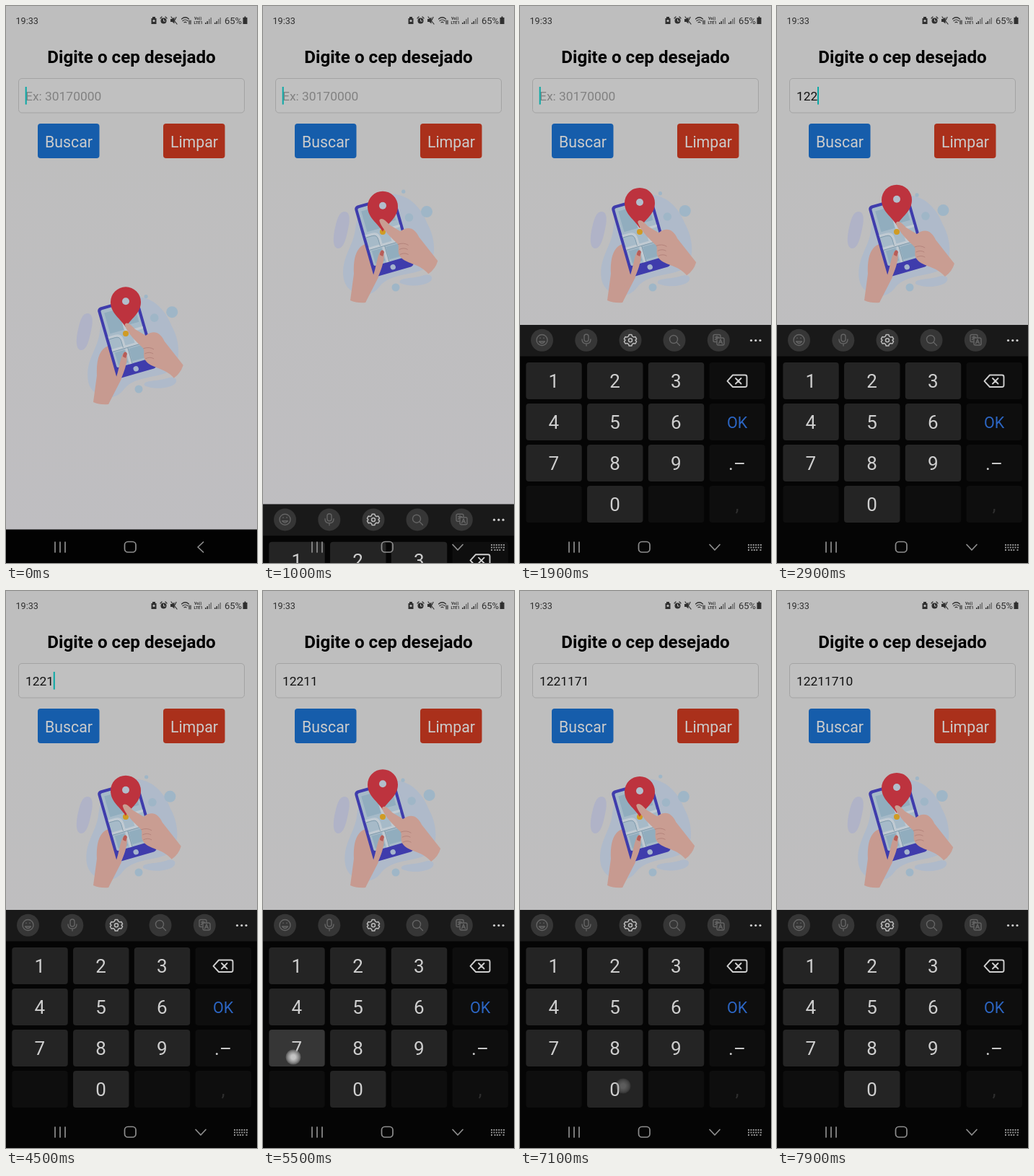
Animation, 348 px wide and 772 px high, one loop 8 s. Source, as an HTML page:

```html
<!DOCTYPE html>
<html lang="pt-BR">
<head>
<meta charset="utf-8">
<title>Busca de CEP</title>
<style>
html, body { margin: 0; width: 100%; height: 100%; overflow: hidden; background: #bebebe; }
svg { display: block; width: 348px; height: 772px; font-family: Roboto, Arial, sans-serif; }
.mid { text-anchor: middle; }
.line { fill: none; stroke-linecap: round; stroke-linejoin: round; }
</style>
</head>
<body>
<svg viewBox="0 0 348 772">
  <defs>
    <linearGradient id="page" x2="0" y2="1">
      <stop offset=".25" stop-color="#bebebe"/><stop offset="1" stop-color="#bfbec1"/>
    </linearGradient>
    <radialGradient id="glow">
      <stop offset=".3" stop-color="#c4c4c4"/><stop offset=".75" stop-color="#858585"/><stop offset="1" stop-color="#777" stop-opacity=".5"/>
    </radialGradient>
    <clipPath id="screen"><rect x="4" y="4" width="50" height="83" rx="2"/></clipPath>
  </defs>
  <rect width="348" height="772" fill="url(#page)"/>

  <!-- status bar -->
  <g fill="#303030">
    <text x="13.500" y="24.500" font-size="12.600">19:33</text>
    <text x="303" y="24.500" font-size="13">65%</text>
    <path d="M203 15h4v2h1.500v8h-7v-8h1.500z"/>
    <circle cx="205" cy="20.500" r="1.600" fill="#bebebe"/>
    <circle cx="218.500" cy="20.500" r="4"/>
    <path d="M228 18h2.500l3-2.500v9l-3-2.500H228z"/>
    <path d="M328.500 16h2v-1.500h2V16h2v9h-6z"/>
    <g font-size="5.500" font-weight="700"><text x="261" y="19">Vo))</text><text x="260.500" y="25">LTE1</text></g>
    <path d="M276 25v-2h1.500v2zM278.500 25v-4h1.500v4zM289 25v-2h1.500v2zM291.500 25v-4h1.500v4z"/>
    <path d="M281 25v-7h1.500v7zM283.500 25v-9h1.500v9zM294 25v-7h1.500v7zM296.500 25v-9h1.500v9z" opacity=".55"/>
  </g>
  <g class="line" stroke="#303030" stroke-width="1.200">
    <path d="M214 17l2-2M223 17l-2-2M236 15.500l-2 4M229 15l8 10M243.500 18q5-4.500 10 0M245 20.500q3.500-3 7 0M247 22.800q1.500-1.500 3 0M254 20v5M256 25v-5"/>
    <path d="M218.500 18.500v2.500h2" stroke="#bebebe" stroke-width="1"/>
  </g>

  <!-- form -->
  <text class="mid" x="174" y="79" font-size="24.200" font-weight="700">Digite o cep desejado</text>
  <rect x="17.500" y="100.500" width="313" height="47.500" rx="4.500" fill="#c0c0c0" stroke="#a3a3a3"/>
  <text id="field" x="27" y="131" font-size="17.400"></text>
  <rect id="caret" y="112" width="2" height="24.500" fill="#0aa9a6"/>
  <rect x="44" y="163" width="85.500" height="48" rx="4" fill="#165dab"/>
  <rect x="218" y="163" width="85.500" height="48" rx="4" fill="#aa301b"/>
  <g class="mid" font-size="21.300" fill="#cbcbcb"><text x="87" y="195.500">Buscar</text><text x="261" y="195.500">Limpar</text></g>

  <!-- illustration -->
  <g id="art">
    <path d="M113 285C121 285 121 297 118 309C115 323 112 336 104 336C96 335 97 320 100 307C103 294 106 285 113 285Z" fill="#b0b3c7"/>
    <g id="blob" fill="#afbaca">
      <path d="M172 263C198 258 220 276 230 303C241 322 243 350 232 362C216 376 180 370 164 390C150 411 118 402 114 379C110 350 127 336 130 312C134 282 148 266 172 263Z"/>
      <path d="M192 385C190 377 210 380 224 375C236 371 240 379 233 384C222 391 200 390 192 385Z"/>
    </g>
    <g id="dots" fill="#9fb6c7">
      <circle cx="230.500" cy="283" r="8"/><circle cx="206" cy="291" r="5.800"/>
    </g>
    <g fill="#9fb6c7"><circle cx="184" cy="390" r="5.500"/><circle id="speck" cx="194" cy="262" r="2.600"/></g>
    <path d="M121 408L126 371C125 348 130 334 142 330L160 376L142 411Q130 412 121 408Z" fill="#c79a90"/>
    <g transform="translate(126 278) rotate(-16)">
      <rect width="58" height="102" rx="5" fill="#3f3cac"/>
      <g clip-path="url(#screen)">
        <rect width="58" height="90" fill="#a6bac8"/>
        <path d="M8 9h20v30H8zM33 9h18v25H33zM7 66h14v18H7zM27 66h23v18H27z" fill="#91adbe"/>
        <path class="line" d="M0 44H14Q22 44 22 52V62M0 62H58M30 0V38Q30 43 36 43H58M24 62V90M39 43V62" stroke="#c0cad2" stroke-width="3.500"/>
        <path class="line" d="M0 46H13Q20 46 20 53V62M0 64H58M26 64V90" stroke="#7f9aaa" stroke-width=".9"/>
      </g>
      <circle cx="29" cy="95.500" r="3.700" fill="#a5b4cc"/>
    </g>
    <circle cx="166" cy="313" r="4" fill="#d09b24"/>
    <g id="pin">
      <path d="M166 306C159 294 145 287 145 271A21 21 0 0 1 187 271C187 287 173 294 166 306Z" fill="#bd333e"/>
      <circle cx="166" cy="270" r="5" fill="#b2becb"/>
    </g>
    <path d="M152 376C158 360 158 343 165 338C171 342 167 360 158 379C149 391 146 398 142 411L134 402Z" fill="#c79a90"/>
    <path d="M162 345C162 339 166 336 168 341L166 347Z" fill="#b75d58"/>
    <g id="hand">
      <path d="M165 301C167 296 173 300 179 307L194 316C205 308 214 311 220 324L246 357Q243 368 233 375C222 362 208 362 198 355C188 347 193 341 191 334C183 326 168 313 165 301Z" fill="#c99d92"/>
      <path class="line" d="M191 334Q199 331 205 335M193 341Q199 338 204 341M194 348Q200 345 205 348" stroke="#b4847c"/>
    </g>
  </g>

  <rect y="725.500" width="348" height="47" fill="#020202"/>

  <!-- keyboard -->
  <g id="board">
    <rect y="442" width="348" height="360" fill="#050505"/>
    <rect y="442" width="348" height="43.500" fill="#191919"/>
    <g id="tools" fill="#363636"></g>
    <g class="line" stroke="#646464" stroke-width="1.400">
      <circle cx="30.500" cy="463" r="7.500"/><path d="M26.500 465q4 5 8 0zM28 460v.5M33 460v.5"/>
      <rect x="89" y="455" width="6" height="10" rx="3"/><path d="M86 462q0 6 6 6t6-6M92 468v3"/>
      <circle cx="213" cy="462" r="5.500"/><path d="M217 466l4.500 4.500"/>
      <rect x="268" y="455.500" width="10" height="10" rx="2"/><rect x="273" y="460" width="10" height="10" rx="2" fill="#363636"/>
      <path d="M270.500 459h5M273 457.500q0 4-2.500 5M275.500 468l2.500-6 2.500 6M276.500 466h3"/>
    </g>
    <g class="line" stroke="#bcbcbc" stroke-width="1.500">
      <path d="M151.200 455.500h3.600l.8 2.300 2 1.100 2.300-.5 1.700 3-1.600 1.800 1.600 1.800-1.700 3-2.300-.5-2 1.100-.8 2.300h-3.600l-.8-2.300-2-1.100-2.300.5-1.700-3 1.600-1.800-1.600-1.800 1.700-3 2.300.5 2-1.100z"/>
      <circle cx="153" cy="463.200" r="2.500"/>
    </g>
    <g fill="#d0d0d0"><circle cx="320.500" cy="463.500" r="1.600"/><circle cx="326.800" cy="463.500" r="1.600"/><circle cx="333" cy="463.500" r="1.600"/></g>
    <g id="keys" class="mid"></g>
    <path class="line" d="M295 511.500H312Q314.500 511.500 314.500 514V525.500Q314.500 528 312 528H295L287.500 519.800ZM299 516l7.500 7.500M306.500 516l-7.500 7.500" stroke="#cfcfcf" stroke-width="1.900"/>
    <circle id="touch" r="10.500" fill="url(#glow)"/>
  </g>

  <!-- navigation -->
  <g class="line" stroke="#8e8e8e" stroke-width="1.700">
    <path d="M68 743v14M75 743v14M82 743v14"/>
    <rect x="164.500" y="742.500" width="15.500" height="14.500" rx="4.500"/>
    <path id="back" d="M273.500 743l-7.500 7 7.500 7"/>
  </g>
  <path id="grid" d="M316 747h19M316 750.500h19M316 754h2.500M320.500 754h10M332.500 754h2.500" stroke="#929292" stroke-width="2" stroke-dasharray="2 1.400"/>
</svg>
<script>
const $ = id => document.getElementById(id);
const NS = 'http://www.w3.org/2000/svg';
const LOOP = 8000, OPEN = 965;

// digit, finger down, finger up, touch x, touch y
const taps = [
  ['1', 1950, 2060, 44, 524],
  ['2', 2290, 2400, 130, 524],
  ['2', 2630, 2740, 130, 524],
  ['1', 4000, 4110, 44, 524],
  ['1', 4790, 4900, 44, 524],
  ['7', 5440, 5600, 42, 646],
  ['1', 6220, 6360, 44, 524],
  ['0', 7080, 7180, 143, 686]
];

function add(parent, tag, attrs, text = '') {
  const el = document.createElementNS(NS, tag);
  for (const k in attrs) el.setAttribute(k, attrs[k]);
  el.textContent = text;
  return parent.appendChild(el);
}
const set = (id, name, value) => $(id).setAttribute(name, value);
const move = (id, x, y) => set(id, 'transform', `translate(${x} ${y})`);

[30.5, 91.8, 153, 214, 275.3].forEach(cx => add($('tools'), 'circle', { cx, cy: 463.2, r: 15.5 }));

const keys = {};
['1', '2', '3', '', '4', '5', '6', 'OK', '7', '8', '9', '.–', '', '0', '', ','].forEach((label, i) => {
  const col = i % 4, row = i >> 2, digit = /\d/.test(label);
  const x = 8.3 + col * 84.75, y = 494 + row * 57;
  const rect = add($('keys'), 'rect', { x, y, width: 77.4, height: 51, rx: 4, fill: digit ? '#242424' : '#0e0e0e' });
  if (digit) keys[label] = rect;
  const fill = label === 'OK' ? '#2c66c4' : label === ',' ? '#2e2e2e' : '#cfcfcf';
  const size = label === 'OK' ? 21.5 : 26;
  add($('keys'), 'text', { x: x + 38.5, y: y + 26 + size * 0.355, 'font-size': size, fill }, label);
});

function draw(t) {
  // floating illustration
  const bob = Math.cos((t - 1150) / 3000 * 2 * Math.PI);
  const sway = bob + 0.9;
  const open = t >= OPEN;
  move('art', 0, open ? 0 : 141);
  move('pin', 0, 2 + 5 * bob);
  move('hand', -2 * sway, -2 * sway);
  move('dots', -1.9 * sway, 1.1 * sway);
  move('blob', -1.2 * sway, -0.8 * sway);
  move('speck', 0.4 * sway, -2.6 * sway);

  // keyboard slides in
  const p = Math.min(1, Math.max(0, (t - OPEN) / 400));
  move('board', 0, 330 * (1 - p) ** 3);
  set('back', 'transform', open ? 'rotate(-90 270 750)' : '');
  set('grid', 'opacity', +open);

  // typed digits and blinking caret
  const done = taps.filter(tap => t >= tap[2]);
  const value = done.map(tap => tap[0]).join('');
  const since = t - (done.length ? done[done.length - 1][2] : -350);
  $('field').textContent = value || 'Ex: 30170000';
  set('field', 'fill', value ? '#111' : '#818181');
  set('caret', 'x', 26.7 + value.length * 9.77);
  set('caret', 'opacity', +(since % 1000 < 500));

  // finger
  const tap = taps.find(([, down, up]) => t >= down && t < up);
  for (const k in keys) {
    const lit = tap && tap[0] === k && t - tap[1] > 50;
    keys[k].setAttribute('fill', lit ? '#363636' : '#242424');
  }
  set('touch', 'opacity', tap ? Math.min(1, (t - tap[1]) / 60) : 0);
  if (tap) move('touch', tap[3], tap[4]);
}

function frame() {
  draw(performance.now() % LOOP);
  requestAnimationFrame(frame);
}
frame();
</script>
</body>
</html>
```
